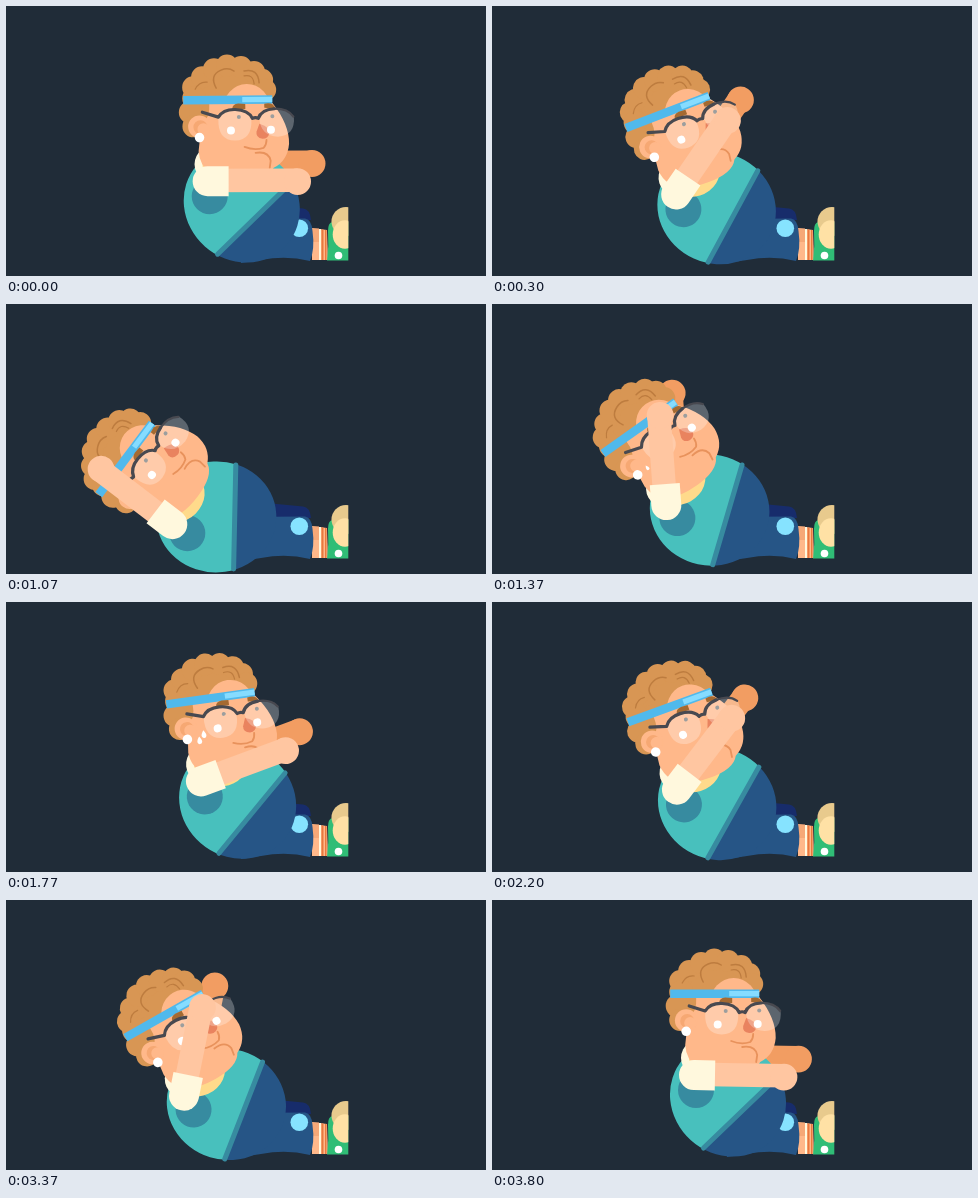
An HTML page with a canvas that plays this animation: 480x270 px, repeating every 3.83 s.

```html
<!DOCTYPE html>
<html lang="en">
<head>
<meta charset="utf-8">
<title>Sit-ups</title>
<style>
html, body { margin: 0; width: 100%; height: 100%; overflow: hidden; background: #202c38; }
canvas { display: block; width: 480px; height: 270px; }
</style>
</head>
<body>
<canvas id="stage"></canvas>
<script>
const canvas = document.getElementById('stage');
const ctx = canvas.getContext('2d');
const scale = window.devicePixelRatio || 1;
canvas.width = 480 * scale;
canvas.height = 270 * scale;

const LOOP = 3830, REP = LOOP / 2;
const C = {
  back: '#202c38', face: '#ffb88a', arm: '#ffc6a1', far: '#f29d62',
  hair: '#d89654', curl: '#bd7c3f', band: '#50b9ec', shine: '#86dcff', rim: '#484950',
  shirt: '#48c0bd', trim: '#378ba0', pants: '#265586', navy: '#172c6b', pad: '#86e3ff',
  cream: '#fff8dd', collar: '#ffda8b', line: '#e8925c', nose: '#e9835f', brow: '#a56a31'
};
const rad = d => d * Math.PI / 180;

function ellipse(x, y, rx, ry, fill) {
  ctx.beginPath();
  ctx.ellipse(x, y, rx, ry, 0, 0, 7);
  ctx.fillStyle = fill;
  ctx.fill();
}
const disc = (x, y, r, fill) => ellipse(x, y, r, r, fill);
function rect(x, y, w, h, fill) {
  ctx.fillStyle = fill;
  ctx.fillRect(x, y, w, h);
}
function shape(d, fill) {
  ctx.fillStyle = fill;
  ctx.fill(new Path2D(d));
}
function stroke(d, color, width) {
  ctx.strokeStyle = color;
  ctx.lineWidth = width;
  ctx.lineCap = 'round';
  ctx.lineJoin = 'round';
  ctx.stroke(new Path2D(d));
}
function turned(x, y, deg, draw) {
  ctx.save();
  ctx.translate(x, y);
  ctx.rotate(rad(deg));
  ctx.translate(-x, -y);
  draw();
  ctx.restore();
}

// Lean of the head in degrees: steady swing with a rest at the bottom.
function lean(t) {
  const phase = (t + 17) % REP;
  const u = REP / 2 - Math.abs(REP / 2 - phase);
  return Math.min(53.2, Math.max(0, (u - 12) * 0.0685));
}

function shoulder(deg) {
  const a = rad(deg), x = -40, y = -62;
  return [240 + x * Math.cos(a) + y * Math.sin(a), 237 - x * Math.sin(a) + y * Math.cos(a)];
}

function arm(x, y, deg, fill, sleeve) {
  ctx.save();
  ctx.translate(x, y);
  ctx.rotate(rad(deg));
  ctx.translate(2, 0);
  shape('M0-12.5L90-12.5L90 11L0 11Z', fill);
  disc(90, 0.5, 13.4, fill);
  if (sleeve) shape('M21-15L0-15A15 15 0 0 0 0 15L21 15Z', C.cream);
  ctx.restore();
}

function legs() {
  shape('M250 198L297 202.5Q304 203 305 214L250 217Z', C.navy);
  shape('M306 222L321 224L322 254L306 254Z', C.face);
  rect(306, 222.5, 7, 13.5, '#f6a877');
  shape('M313 223L315 223L315 254L313 254Z', C.cream);
  rect(315.5, 223.5, 2, 30.5, '#e9783e');
  rect(319, 224, 1.5, 30, '#e9783e');
  ctx.save();
  ctx.beginPath();
  ctx.rect(300, 195, 42.3, 59.5);
  ctx.clip();
  shape('M326 216L343 216L343 255L321 255Q323 240 322 225Q322 217 326 216Z', '#30bd76');
  ellipse(340, 215.5, 14.5, 14.5, '#e8ca8d');
  ellipse(339, 228.5, 12.3, 14.3, '#ffe1a5');
  disc(332.5, 249.5, 3.8, '#fff');
  ctx.restore();
  shape('M235 213L299 212.5Q306 214 306.5 225Q309 243 304 255Q280 249 255 254L235 257Z', C.pants);
  disc(293.3, 222.3, 8.8, C.pad);
}

function torso() {
  ctx.save();
  const ball = new Path2D();
  ball.ellipse(236, 199, 60, 55.5, rad(42), 0, 7);
  ctx.clip(ball);
  shape('M160 120L345 120L212 249L200 290L160 290Z', C.shirt);
  shape('M212 249L288 174L330 134L330 280L200 280Z', C.pants);
  ctx.restore();
  stroke('M211.5 248L286.5 176', C.trim, 5);
  disc(204, 190, 18, C.trim);
  ellipse(216, 158, 27, 22, C.cream);
  ellipse(224, 159, 27, 23, C.collar);
}

const CURLS = [
  [187, 81, 11], [196, 71, 11], [208, 63, 11], [221, 59.5, 11], [235, 61, 11],
  [248, 66, 11], [256, 74, 11], [259, 84, 11], [188, 92, 12], [184, 106, 11.5], [187, 120, 11]
];

function hair() {
  ellipse(222, 86, 42, 29, C.hair);
  rect(185, 85, 24, 38, C.hair);
  for (const [x, y, r] of CURLS) disc(x, y, r, C.hair);
  stroke('M210 82Q203 69 215 64Q222 61 228 65', C.curl, 1.5);
  stroke('M238 65Q252 62 253 77', C.curl, 1.5);
  stroke('M238 70Q247 68 248 78', C.curl, 1.2);
  stroke('M189 83Q193 75 201 76', C.curl, 1.2);
}

function glasses() {
  const glass = 'rgba(255,255,255,.27)';
  shape('M212 113Q216 104 229 104Q242 105 245 113Q246 134 228.5 134.5Q211 134 212 113Z', glass);
  shape('M253 113Q256 104 268 103.5Q282 103 287.500 111Q289 130 271.500 131Q254 130 253 113Z', glass);
  stroke('M196 106L212 111Q217 103 229 103.5Q242 104 246 112.5Q249 111 252 112.5Q255 103.5 268 103', C.rim, 3.2);
  stroke('M267 103Q281 102.5 287 111', C.rim, 2.2);
}

function ear() {
  disc(193, 120.5, 11.3, C.face);
  disc(194, 121, 7, '#f6a873');
  disc(197, 123, 6, C.face);
  disc(193, 131.3, 4.8, '#fff');
}

function head(t) {
  hair();
  ellipse(240.5, 104, 24, 26, C.face);
  shape('M203 97L266 97Q283 119 282.5 138Q281 155 267 162Q261 174 235 174Q194 174 192 145L195 118Q204 112 203 97Z', C.face);
  ear();
  rect(177, 89.5, 89, 8.5, C.band);
  rect(236, 91, 30, 5.3, C.shine);
  shape('M226 103Q226 98 232 97.5L239 98L239 103Z', C.brow);
  shape('M258 102L258 98Q267 96 269 103Z', C.brow);
  stroke('M238 141Q248 145 257 142Q260 139 260 134', C.line, 1.8);
  stroke('M249 147Q262 145 264 155L263 162', C.line, 1.8);
  shape('M253 118Q263 121 263 127Q262 133 256 133Q249 132 250 126Z', C.nose);
  disc(232.5, 111, 2, '#777a7a');
  disc(266, 110.5, 2, '#777a7a');
  glasses();
  disc(224.5, 124.5, 4, '#fff');
  disc(264.5, 124, 4, '#fff');
  if (t > 1250 && t < 1850) {
    const k = Math.min(1, (t - 1250) / 500);
    drop(205, 130 + 4 * k, 0.6 + 0.4 * k);
    if (k > 0.5) drop(210, 126 + 2.5 * k, k);
  }
}

function drop(x, y, size) {
  ctx.save();
  ctx.translate(x, y);
  ctx.scale(size, size);
  shape('M0-4Q3 0 2.3 2A2.4 2.4 0 0 1-2.3 2Q-3 0 0-4Z', '#fff');
  ctx.restore();
}

function draw(t) {
  const tilt = lean(t), body = tilt * 0.845, swing = 1 - 2.7 * tilt;
  const [sx, sy] = shoulder(body);
  ctx.setTransform(scale, 0, 0, scale, 0, 0);
  rect(0, 0, 480, 270, C.back);
  arm(sx + 14.5 - 0.07 * tilt, sy - 18 - 0.12 * tilt, swing, C.far);
  legs();
  turned(240, 237, -body, torso);
  ctx.translate(1.2, 0);
  turned(231, 227.4, -tilt, () => head(t));
  ctx.translate(-1.2, 0);
  arm(sx, sy, swing, C.arm, true);
}

const start = performance.now();
function tick() {
  draw((performance.now() - start) % LOOP);
  requestAnimationFrame(tick);
}
tick();
</script>
</body>
</html>
```
